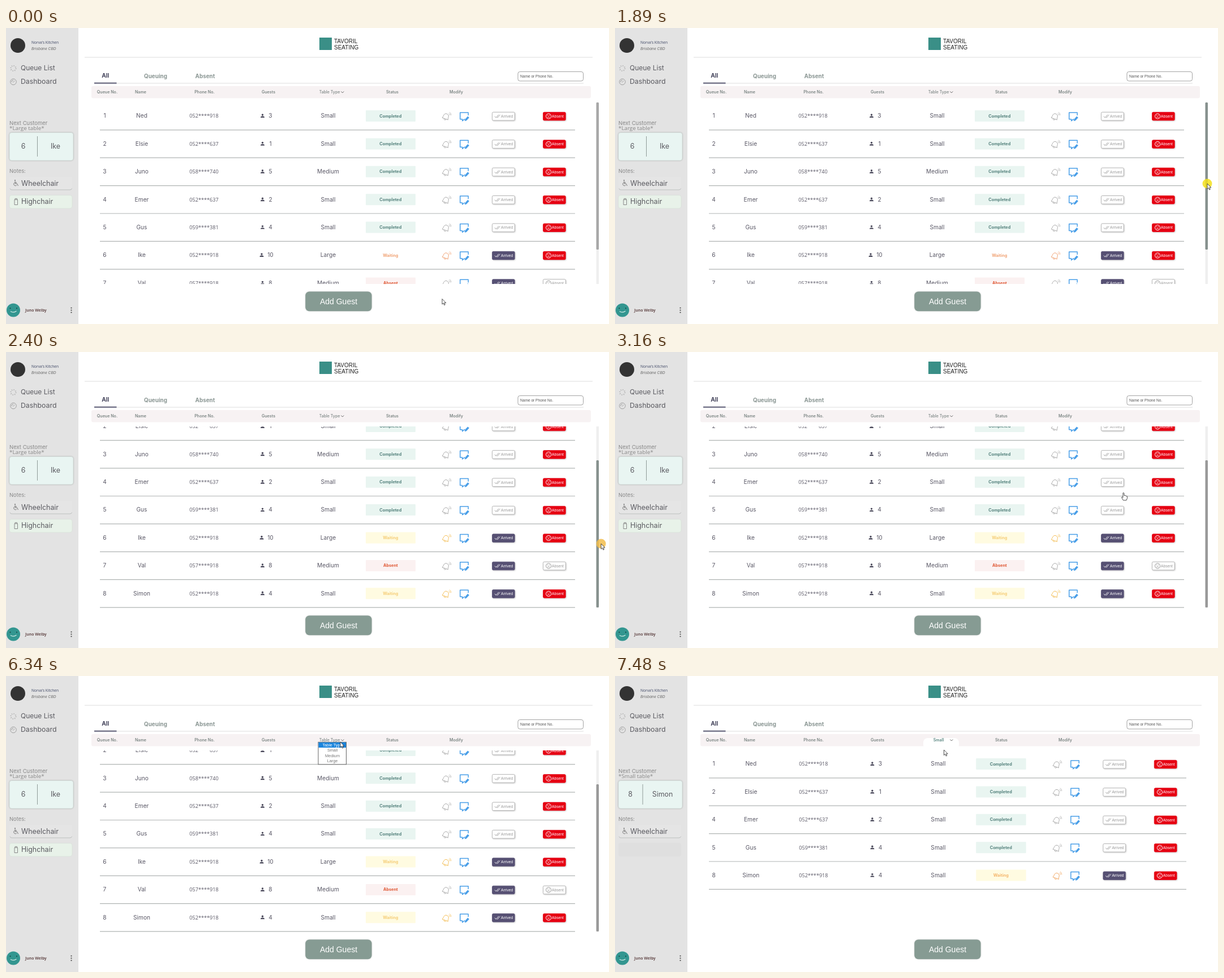
These frames come from a looping animation (1066 by 525 pixels, 8000 ms). An HTML page:

```html
<!DOCTYPE html>
<html lang="en">
<head>
<meta charset="utf-8">
<title>Guest queue</title>
<style>
html, body { margin: 0; width: 100%; height: 100%; overflow: hidden; background: #fff; }
svg { display: block; font-family: Inter, sans-serif; }
.arial { font-family: "Liberation Sans", Arial, sans-serif; }
.noto { font-family: "Noto Sans", sans-serif; }
.open { font-family: "Open Sans", sans-serif; }
.soft { filter: drop-shadow(1.5px 1.5px 1px #0003); }
.low { filter: drop-shadow(0 .7px .8px #0003); }
</style>
</head>
<body>
<svg id="stage" width="1066" height="525" viewBox="0 0 1066 525">
  <clipPath id="listArea"><rect x="140" y="132" width="900" height="322"/></clipPath>
  <g id="page"></g>
  <g id="side"></g>
  <g clip-path="url(#listArea)"><g id="list"></g></g>
  <g id="scrollbar">
    <rect x="1043.5" y="132" width="4.5" height="322" fill="#efefef"/>
    <rect id="thumb" x="1043.5" y="132" width="4.5" height="261" rx="1.5"/>
  </g>
  <g id="select"></g>
  <g id="menu"></g>
  <circle id="click" r="8.5" opacity=".85"/>
  <g id="pointer"></g>
</svg>
<script>
const LOOP = 8000, PITCH = 49.4, MAX_SCROLL = 73.5, THUMB_TRAVEL = 60;
const $ = id => document.getElementById(id);

const text = (x, y, str, size, fill, more = '') =>
  `<text x="${x}" y="${y}" font-size="${size}" fill="${fill}" ${more}>${str}</text>`;
const mid = (x, y, str, size, fill, more = '') =>
  text(x, y, str, size, fill, `text-anchor="middle" ${more}`);
const rect = (x, y, w, h, fill, r = 0, more = '') =>
  `<rect x="${x}" y="${y}" width="${w}" height="${h}" rx="${r}" fill="${fill}" ${more}/>`;
const circle = (x, y, r, fill, more = '') =>
  `<circle cx="${x}" cy="${y}" r="${r}" fill="${fill}" ${more}/>`;
const line = (d, color, width = 1, more = '') =>
  `<path d="${d}" fill="none" stroke="${color}" stroke-width="${width}" ${more}/>`;
const at = (x, y, content) => `<g transform="translate(${x} ${y})">${content}</g>`;

const SEMI = 'font-weight="600"', BOLD = 'font-weight="700"';
const ARIAL = 'class="arial"', OPEN = 'class="open"';
const chevron = line('M592.3 112.5l2.5 2.5 2.5-2.5', '#666');

const guests = [
  [1, 'Ned', '052****918', 3, 'Small', 'Completed'],
  [2, 'Elsie', '052****637', 1, 'Small', 'Completed'],
  [3, 'Juno', '058****740', 5, 'Medium', 'Completed'],
  [4, 'Emer', '052****637', 2, 'Small', 'Completed'],
  [5, 'Gus', '059****381', 4, 'Small', 'Completed'],
  [6, 'Ike', '052****918', 10, 'Large', 'Waiting'],
  [7, 'Val', '057****918', 8, 'Medium', 'Absent'],
  [8, 'Simon', '052****918', 4, 'Small', 'Waiting']
];

// Each view: look of waiting rows, list width factor, whether filtered
const views = [
  { bg: '#fff', ink: '#f0a274', bell: '#f0a274', stretch: 1, small: false },
  { bg: '#fffbe1', ink: '#f5cd77', bell: '#f3bd55', stretch: 1, small: false },
  { bg: '#fffbe1', ink: '#f5b66c', bell: '#f0a661', stretch: 844 / 840, small: true }
];

const person = circle(0, -2, 1.7, '#4c4b5c') +
  '<path d="M-3.4 3V1.8Q-3 .3 0 .3T3.4 1.8V3Z" fill="#4c4b5c"/>';

const bell = color => '<g transform="translate(-1.3 .5) rotate(20)">' +
  line('M-5.6 4.2C-4.4 3-4.7 0-4.4-1.6A4.5 4.5 0 0 1 4.4-1.6C4.7 0 4.4 3 5.6 4.2ZM-1.8 4.6a1.8 1.8 0 0 0 3.6 0', color, .9, 'stroke-linejoin="round"') +
  '</g>' + line('M3.8-5.2Q5.6-4 5.800-1.600M5-7.200Q7.700-5.400 7.900-1.800', color, .8);

const edit = line('M1 5.3H.5L-3.3 8.2V5.3H-7.2V-6.6H7.2V-1.5', '#4a9fe8', 1.5, 'stroke-linejoin="round"') +
  '<path d="M.8 8.600l.7-3.400 4.800-5.200 2.600 2.400-4.900 5.400Z" fill="#4a9fe8"/>';

function button(label, icon, fill) {
  const plain = fill === '#fff', ink = plain ? '#999' : '#fff';
  return rect(-20, -6.700, 39.8, 14.6, fill, 2, `class="soft" stroke="${plain ? '#999' : fill}" stroke-width=".7"`) +
    icon(ink) + text(-4.5, 2.800, label, 6.7, ink, ARIAL);
}
const ticks = ink => line('M-15.5 .5l2.3 2.6 4.6-5.4M-11.5 2.4l.8.8 4.6-5.4', ink, .9);
const sadFace = ink => circle(-10.3, .5, 4.6, 'none', `stroke="${ink}"`) +
  line('M-12.6 3Q-10.3 0-8 3M-12.800-1.500l1.800.8M-7.800-1.500l-1.800.8', ink, .9);

function row([no, name, phone, count, size, status], y, view) {
  const col = x => 166 + (x - 166) * view.stretch;
  const [bg, ink] = {
    Completed: ['#e9f5f1', '#55827d'],
    Waiting: [view.bg, view.ink],
    Absent: ['#fbf1f1', '#df5733']
  }[status];
  const cell = (x, str, font = 10.2, more = '') => mid(col(x), y + 3.3, str, font, '#5a5866', more);
  return cell(174.5, no) + cell(240, name) + cell(350, phone, 9.1, OPEN) +
    at(col(count > 9 ? 452 : 453.5), y, person) + cell(467.5, count) + cell(569.5, size) +
    rect(col(636), y - 10, 88 * view.stretch, 20, bg, 1) +
    mid(col(679.8), y + 2.5, status, 7.3, ink, BOLD) +
    at(col(779), y + .5, bell(status === 'Waiting' ? view.bell : '#aaa')) +
    at(col(810), y + .5, edit) +
    at(col(879.5), y, button('Arrived', ticks, status === 'Completed' ? '#fff' : '#565073')) +
    at(col(969.5), y, button('Absent', sadFace, status === 'Absent' ? '#fff' : '#e60012')) +
    line(`M166 ${y + 24.8}H${col(1006)}`, '#b0b4b3', 1.2);
}

function sidebar(small) {
  const [no, name, , , size] = guests[small ? 7 : 5];
  const [a, bar, b] = small ? [27, 49, 84] : [30.5, 55.5, 87.5];
  const ink = '#5a5a60';
  const s = rect(0, 0, 128, 525, '#e3e3e3') + circle(21, 31, 13, '#333') +
    text(45, 28, "Norva's Kitchen", 6.6, '#474f6b', 'class="noto" font-weight="500"') +
    text(45, 39, 'Brisbane CBD', 6.6, '#666', 'font-style="italic"') +
    circle(13, 71.5, 4.5, 'none', 'stroke="#aaa" stroke-width="2" stroke-dasharray="1.2 2.33"') +
    text(26, 75.3, 'Queue List', 12, ink) +
    circle(13, 95.5, 5.3, 'none', 'stroke="#999" stroke-width=".9"') +
    line('M12.5 96.5l2.8-3M9.8 96a3.3 3.3 0 0 1 3.2-3.5', '#999', .9) +
    text(26, 99.3, 'Dashboard', 12.3, ink) +
    text(6, 172, 'Next Customer', 9.5, '#888') +
    text(6, 181, `*${size} table*`, 9.8, '#888', OPEN) +
    rect(6, 185.5, 113, 49.5, '#e9f5f2', 4, 'stroke="#c9d1cf" stroke-width=".7" class="low"') +
    mid(a, 214.3, no, 12.4, ink) + mid(b, 214.3, name, 12.4, ink) +
    line(`M${bar} 192V228`, '#8f9b98') +
    text(6, 257, 'Notes:', 9.4, '#888') +
    rect(6, 264, 111, 23, '#e5e5e5', 4) + line('M7 284.5Q7.5 287 10 287H113Q116 287 116.5 284.5', '#b8bbba', .9) +
    circle(16, 270.3, 1.1, '#777') +
    line('M16 272v4h3.5l2 4M16 274h3M14.7 274.5a3 3 0 1 0 4 4.5', '#777') +
    text(27, 279.6, 'Wheelchair', 12.4, ink);
  if (small) return s + rect(6, 296, 111, 24, '#dfdfdf', 4);
  return s + rect(6, 296.5, 111, 23.5, '#e8f2e9', 4, 'stroke="#d5dcd6" stroke-width=".6"') +
    line('M15 304.5h5.5v9h-5.5ZM16 304v-1.5h3.5v1.5', '#888') +
    text(27, 312.3, 'Highchair', 12.4, ink);
}

const account = circle(13, 500.5, 12, '#339690') + circle(7.5, 497, 1, '#173f40') +
  circle(19, 497, 1, '#173f40') + line('M8 502.500Q13 506 18.500 502', '#d5ece8', 1.1) +
  text(34, 503, 'Juno Welby', 6.8, '#6a5050', 'class="noto" font-weight="600"') +
  [496.5, 500.5, 504.5].map(y => circle(115.5, y, 1.1, '#444')).join('');

const headings = [[179, 'Queue No.'], [238, 'Name'], [351, 'Phone No.'], [464, 'Guests'], [683, 'Status'], [796, 'Modify']];
$('page').innerHTML =
  rect(554, 17, 22, 22, '#3a8f87') +
  text(580, 27.3, 'TAVORIL', 10, '#222', ARIAL) + text(580, 37.8, 'SEATING', 10, '#222', ARIAL) +
  line('M139 52H1037', '#ddd') + line('M195 98H1021', '#ddd') +
  mid(175.7, 87.5, 'All', 10.2, '#45455c', BOLD) +
  mid(264.5, 89.3, 'Queuing', 9.9, '#8b9794', BOLD) + mid(352, 89.3, 'Absent', 9.9, '#8b9794', BOLD) +
  rect(156, 96.8, 39.5, 1.8, '#4a4a66') +
  rect(905, 77.5, 115.5, 16.5, '#fff', 3.5, 'stroke="#999" stroke-width=".9"') +
  text(909, 88, 'Name or Phone No.', 6.6, '#555', ARIAL) +
  rect(151, 103, 883, 21.5, '#f7f2f3', 3) +
  headings.map(([x, label]) => mid(x, 116, label, 7.1, '#7b8583', SEMI)).join('') +
  rect(529.3, 467.5, 117.3, 34.8, '#869b93', 7, 'class="low"') +
  mid(588, 489.6, 'Add Guest', 14, '#fff', ARIAL);

function showView(index) {
  const view = views[index];
  const rows = guests.filter(g => !view.small || g[4] === 'Small');
  $('list').innerHTML = rows.map((g, i) => row(g, 156 + i * PITCH, view)).join('');
  $('side').innerHTML = sidebar(view.small) + account;
  $('scrollbar').style.display = view.small ? 'none' : '';
  $('select').innerHTML = (view.small
    ? rect(545, 110, 63, 20, '#fff', 8) + mid(572, 116, 'Small', 7, '#55827d', SEMI)
    : mid(572, 116, 'Table Type', 7, '#7b8583', 'font-weight="500"')) + chevron;
}

const options = ['Table Type', 'Small', 'Medium', 'Large'];
const menu = active => rect(552, 117.3, 49.5, 39.5, '#fff', 0, 'stroke="#555" stroke-width=".9"') +
  rect(552.5, 117.7 + active * 9.5, 48.5, 9.3, '#1a84dc') +
  options.map((label, i) => mid(577, 124.8 + i * 9.45, label, 7.3, i === active ? '#fff' : '#777', ARIAL)).join('');

const arrow = '<path d="M0 0V9.5L2.2 7.5L3.7 11L5.3 10.3L3.8 7H6.8Z" fill="#fff" stroke="#222" stroke-width=".8"/>';
const hand = '<path d="M-1 0Q.5-1 1 .5V4.5Q2.5 3.5 3 5Q4.5 4 5 5.7Q6.5 5 6.5 7V9.5L5 13H-.5L-3.5 8Q-3.5 6.3-1 8Z" fill="#fff" stroke="#222" stroke-width=".8"/>';

// Stepped moves: first step, last step, number of steps, then where they end
const pointerMoves = [
  [130, 240, 2, 843, 453], [390, 490, 2, 923, 394], [630, 1000, 4, 1019, 296],
  [1140, 1500, 4, 1047, 276], [2020, 2140, 2, 1051, 317], [2280, 2400, 2, 1052, 340],
  [2560, 3160, 6, 899, 250], [3280, 3280, 1, 880, 243], [3420, 3920, 5, 615, 126],
  [4060, 4180, 2, 592, 118], [4440, 4440, 1, 592, 116], [4600, 4680, 2, 592, 114],
  [6340, 6340, 1, 591, 117], [6460, 6460, 1, 587, 120], [6620, 6710, 2, 585, 122],
  [6860, 7100, 3, 581.5, 131]
];
const scrollMoves = [[2020, 2140, 2, 50.7], [2280, 2400, 2, MAX_SCROLL]];

function follow(moves, start, t) {
  let pos = start;
  for (const [from, to, steps, ...end] of moves) {
    if (t < from) break;
    const gap = (to - from) / Math.max(1, steps - 1);
    const done = gap ? Math.min(steps, Math.floor((t - from) / gap + 1e-6) + 1) : 1;
    pos = pos.map((p, i) => p + (end[i] - p) * done / steps);
  }
  return pos;
}

const between = (t, a, b) => t >= a && t < b;
const shown = {};
function update(key, value, draw) {
  if (shown[key] !== value) draw(shown[key] = value);
}

function frame(now) {
  const t = now % LOOP;
  const [x, y] = follow(pointerMoves, [771, 480.5], t);
  const [scroll] = follow(scrollMoves, [0], t);
  const view = t < 2020 ? 0 : t < 7350 ? 1 : 2;
  update('view', view, showView);
  $('list').setAttribute('transform', `translate(0 ${view === 2 ? 0 : -scroll})`);
  $('thumb').setAttribute('y', 132 + scroll / MAX_SCROLL * THUMB_TRAVEL);
  $('thumb').setAttribute('fill', t < 1500 ? '#a8a8a8' : t < 2560 ? '#87918e' : '#999');

  const active = between(t, 5080, 7350) ? Math.max(0, Math.floor((y - 117.5) / 9.5)) : -1;
  update('menu', active, i => $('menu').innerHTML = i < 0 ? '' : menu(i));

  const click = $('click');
  click.style.display = between(t, 1770, 2560) || between(t, 4970, 5080) ? '' : 'none';
  click.setAttribute('cx', x);
  click.setAttribute('cy', y);
  click.setAttribute('fill', between(t, 2020, 2560) ? '#f2bd4c' : '#f3e11c');

  update('hand', between(t, 3160, 3420), on => $('pointer').innerHTML = on ? hand : arrow);
  $('pointer').setAttribute('transform', `translate(${x} ${y})`);
  requestAnimationFrame(frame);
}
requestAnimationFrame(frame);
</script>
</body>
</html>
```
